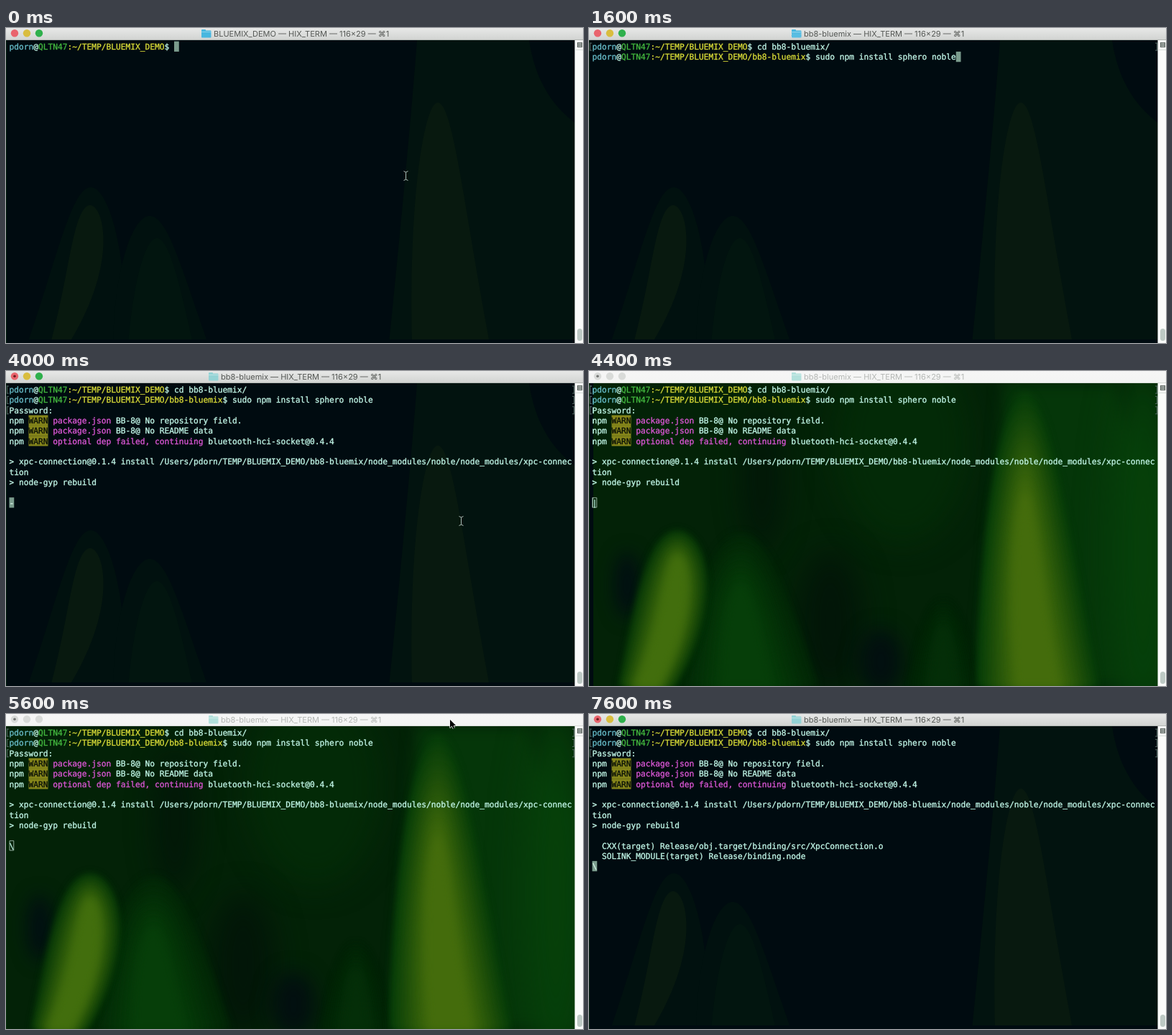
Animation of 803 by 439 pixels, one loop 8 s. Source, as an HTML page with a canvas:

```html
<!DOCTYPE html>
<html lang="en">
<head>
<meta charset="utf-8">
<title>Terminal</title>
<style>
html, body { margin: 0; width: 100%; height: 100%; overflow: hidden; background: #000b10; }
canvas { display: block; width: 803px; height: 439px; }
</style>
</head>
<body>
<canvas id="stage" width="803" height="439"></canvas>
<script>
const W = 803, H = 439, BAR = 17, EDGE = 791.5, FLOOR = 434;
const LOOP = 8000, STEP = 400;
const COL = 6.75, ROW = 14.33, LEFT = 4.5, TOP = 18.6;
const MONO = '11.2px "DejaVu Sans Mono", monospace';
const TITLE = '11px Inter, "DejaVu Sans", sans-serif';
const C = {
  text: '#bff3e4', user: '#66bac6', host: '#42b43e', path: '#d6d837',
  pink: '#d956d3', warn: '#85851a', ink: '#0c1208', cursor: '#7b9c8d'
};
const USER = 'pdorn', HOST = 'QLTN47', HOME = '~/TEMP/BLUEMIX_DEMO';
const CD = 'cd bb8-bluemix/', INSTALL = 'sudo npm install sphero noble';
const SPINNER = '\\-|/-\\|/--\\';
const ctx = document.getElementById('stage').getContext('2d');

const disc = (x, y, r, color) => {
  ctx.fillStyle = color;
  ctx.beginPath();
  ctx.arc(x, y, r, 0, 7);
  ctx.fill();
};

const mix = (a, b, k) => `rgb(${a.map((v, i) => v + (b[i] - v) * k)})`;

function layer(base, paint) {
  const c = document.createElement('canvas');
  c.width = W;
  c.height = H;
  const g = c.getContext('2d');
  g.fillStyle = base;
  g.fillRect(0, 0, W, H);
  paint(g);
  return c;
}

// A leaning hill: its half-width grows with the square root of the depth.
function hill(g, { x, top, w, lean = 0, taper = 0 }, color) {
  const side = sign => s =>
    g.lineTo(x + lean * s * s + sign * w * Math.sqrt(s) * (1 - taper * s), top + s * (H - top));
  const left = side(-1), right = side(1);
  g.fillStyle = color;
  g.beginPath();
  for (let i = 40; i >= 0; i--) left((i / 40) ** 2);
  for (let i = 0; i <= 40; i++) right((i / 40) ** 2);
  g.fill();
}

// Nested hills that run from a faint skirt to a bright core.
function ridge(g, shape, drop, from, to) {
  const n = 9;
  g.filter = 'blur(5px)';
  for (let i = 0; i <= n; i++) {
    const k = i / n;
    hill(g, { ...shape, top: shape.top + drop * k, w: shape.w * (1 - .65 * k) }, mix(from, to, k));
  }
  g.filter = 'none';
}

function shoulder(g, color) {
  g.fillStyle = color;
  g.beginPath();
  g.moveTo(533, H);
  g.quadraticCurveTo(562, 150, 572, BAR);
  g.lineTo(728, BAR);
  g.quadraticCurveTo(740, 100, W, 140);
  g.lineTo(W, H);
  g.fill();
}

function glow(g, x, y, rx, ry, color, blur) {
  g.filter = `blur(${blur}px)`;
  g.fillStyle = color;
  g.beginPath();
  g.ellipse(x, y, rx, ry, 0, 0, 7);
  g.fill();
  g.filter = 'none';
}

const capsule = { x: 117, top: 247, w: 52, lean: -42, taper: .75 };
const peak = { x: 601, top: 104, w: 54, lean: 18 };

const dark = layer('#000b10', g => {
  g.beginPath();
  g.rect(0, BAR, W, FLOOR - BAR);
  g.clip();
  shoulder(g, '#02130f');
  hill(g, peak, '#08190f');
  hill(g, { x: 118, top: 222, w: 68, lean: -20 }, '#01110f');
  hill(g, { x: 200, top: 262, w: 66, lean: 15 }, '#01110f');
  hill(g, { x: 210, top: 293, w: 45, lean: 5 }, '#02150f');
  hill(g, capsule, '#08190f');
});

const bright = layer('#032207', g => {
  glow(g, 430, 100, 95, 140, '#032a07', 20);
  glow(g, 235, 150, 30, 100, '#021808', 18);
  glow(g, 330, 350, 45, 100, '#021608', 20);
  g.filter = 'blur(10px)';
  shoulder(g, '#053609');
  g.filter = 'none';
  glow(g, 765, 250, 45, 260, '#06400a', 24);
  glow(g, 400, 405, 30, 45, '#020f10', 14);
  ridge(g, { x: 487, top: 320, w: 48 }, 40, [3, 36, 7], [4, 46, 8]);
  ridge(g, { x: 205, top: 225, w: 100, lean: 8 }, 75, [3, 38, 7], [6, 62, 9]);
  glow(g, 47, 298, 17, 46, '#010e12', 12);
  ridge(g, { ...capsule, top: 222, w: 100, taper: .6 }, 38, [8, 56, 8], [66, 110, 13]);
  ridge(g, { ...peak, top: 30, w: 85 }, 140, [8, 62, 9], [68, 108, 12]);
});

function write(str, col, row, color) {
  ctx.fillStyle = ctx.strokeStyle = color;
  ctx.lineWidth = .35;
  const y = TOP + row * ROW + 11.3;
  [...str].forEach((ch, i) => {
    if (ch === ' ') return;
    const x = LEFT + (col + i) * COL;
    ctx.fillText(ch, x, y);
    ctx.strokeText(ch, x, y);
  });
  return col + str.length;
}

function line(row, ...parts) {
  let col = 0;
  for (const [str, color] of parts) col = write(str, col, row, color || C.text);
  return col;
}

function prompt(row, dir, cmd) {
  return line(row, [USER, C.user], ['@'], [HOST, C.host], [':' + dir, C.path], ['$ '], [cmd]);
}

function warn(row, label, rest) {
  ctx.fillStyle = C.warn;
  ctx.fillRect(LEFT + 4 * COL, TOP + row * ROW, 4 * COL, ROW);
  line(row, ['npm '], ['WARN', C.ink], [' ' + label + ' ', C.pink], [rest]);
}

function brackets(row) {
  const y = TOP + row * ROW + 2;
  ctx.fillStyle = '#52645f';
  for (const [x, foot] of [[1, 1], [790, 788]]) {
    ctx.fillRect(x, y, 1, 11);
    ctx.fillRect(foot, y, 3, 1);
    ctx.fillRect(foot, y + 10, 3, 1);
  }
}

function caret(col, row, active, ch = '') {
  const x = LEFT + col * COL, y = TOP + row * ROW;
  if (active) {
    ctx.fillStyle = C.cursor;
    ctx.fillRect(x, y, COL, ROW);
  } else {
    ctx.strokeStyle = '#93ae9e';
    ctx.lineWidth = 1;
    ctx.strokeRect(x + .5, y + .5, COL - 1, ROW - 1);
  }
  write(ch, col, row, active ? '#d5f5e8' : C.text);
}

function folder(x, color, hatched) {
  ctx.fillStyle = color;
  ctx.beginPath();
  ctx.roundRect(x, 2, 6, 4, 1);
  ctx.roundRect(x, 3.5, 13.5, 10, 1);
  ctx.fill();
  ctx.fillStyle = 'rgba(255,255,255,.35)';
  ctx.fillRect(x, 5, 13.5, 1);
  if (!hatched) return;
  for (let y = 6; y < 13; y += 2)
    for (let i = y / 2 % 2; i < 13; i += 2) ctx.fillRect(x + i, y, 1, 1);
}

function titleBar(t, active) {
  const fill = ctx.createLinearGradient(0, 0, 0, BAR);
  fill.addColorStop(0, active ? '#e7e8e7' : '#f6f6f6');
  fill.addColorStop(1, active ? '#d1d3d1' : '#f3f4f3');
  ctx.fillStyle = fill;
  ctx.fillRect(0, 0, W, BAR);
  ctx.fillStyle = active ? '#b2b6b3' : '#d8dbd8';
  ctx.fillRect(0, BAR - 1, W, 1);
  ['#e9646d', '#d9bd3e', '#2fb04c'].forEach((color, i) =>
    disc(12 + 17 * i, 7.3, 5.2, active ? color : '#d9dbd9'));
  if (t >= 2400) disc(12, 7.3, 1.8, active ? '#6b1d20' : '#737573');
  const inside = t >= 1200, x = inside ? 282 : 272;
  folder(x, t < 2400 ? '#49b7df' : active ? '#94d3d5' : '#b3e1dc', inside && t < 2400);
  ctx.font = TITLE;
  ctx.fillStyle = active ? '#555855' : '#b4b7b4';
  ctx.fillText((inside ? 'bb8-bluemix' : 'BLUEMIX_DEMO') + ' — HIX_TERM — 116×29 — ⌘1', x + 17, 11.5);
}

function scrollBar() {
  ctx.fillStyle = '#fafbfa';
  ctx.fillRect(EDGE, BAR, W - EDGE, H);
  ctx.fillStyle = '#d9dedb';
  ctx.fillRect(793, 30, 10, 1);
  ctx.fillStyle = '#59615d';
  ctx.fillRect(795, 20, 7, 7);
  ctx.fillStyle = '#c3cbc7';
  for (let y = 21; y < 26; y += 2) ctx.fillRect(796, y, 5, 1);
  ctx.fillStyle = '#bdc9c4';
  ctx.beginPath();
  ctx.roundRect(795, 419, 7, 17, 3.5);
  ctx.fill();
}

function backdrop(t, active) {
  // The bright picture drifts a little to the left.
  ctx.drawImage(active ? dark : bright, active ? 0 : 6 - 6 * (t - 4400) / 1200, 0);
  ctx.fillStyle = active ? '#03200f' : '#04300a';
  ctx.fillRect(0, BAR, 1, H);
}

function iBeam(x, y) {
  ctx.strokeStyle = '#aebdb7';
  ctx.lineWidth = 1;
  ctx.beginPath();
  for (const s of [-1, 1]) {
    ctx.moveTo(x - 2.5, y + 6.5 * s);
    ctx.lineTo(x + .5, y + 5 * s);
    ctx.lineTo(x + 3.5, y + 6.5 * s);
  }
  ctx.moveTo(x + .5, y - 5);
  ctx.lineTo(x + .5, y + 5);
  ctx.stroke();
}

function arrow(x, y) {
  const head = new Path2D(`M${x} ${y}v11l3-3h5z`);
  const tail = new Path2D(`M${x + 3} ${y + 7}l2.3 5`);
  for (const [color, grow] of [['#fff', 1.4], ['#000', 0]]) {
    ctx.strokeStyle = ctx.fillStyle = color;
    ctx.lineWidth = 2 + grow;
    ctx.stroke(tail);
    ctx.lineWidth = grow || .1;
    ctx.stroke(head);
    ctx.fill(head);
  }
}

function terminal(t, active) {
  ctx.font = MONO;
  const first = prompt(0, HOME, t < 800 ? '' : CD);
  if (t < 1200) {
    if (t !== 400) caret(first, 0, true);
    return;
  }
  brackets(0);
  const second = prompt(1, HOME + '/bb8-bluemix', t < 1600 ? INSTALL.slice(0, 8) : INSTALL);
  if (t < 2000) return caret(second, 1, true);
  brackets(1);
  const pass = line(2, ['Password:']);
  if (t < 3200) return caret(pass, 2, true);
  brackets(2);
  if (t < 3600) return caret(0, 3, true);
  warn(3, 'package.json', 'BB-8@ No repository field.');
  warn(4, 'package.json', 'BB-8@ No README data');
  warn(5, 'optional dep failed, continuing', 'bluetooth-hci-socket@0.4.4');
  const job = `> xpc-connection@0.1.4 install /Users/${USER}/TEMP/BLUEMIX_DEMO/bb8-bluemix/node_modules/noble/node_modules/xpc-connection`;
  line(7, [job.slice(0, 116)]);
  line(8, [job.slice(116)]);
  line(9, ['> node-gyp rebuild']);
  let row = 11;
  if (t >= 6000) line(row++, ['  CXX(target) Release/obj.target/binding/src/XpcConnection.o']);
  if (t >= 7600) line(row++, ['  SOLINK_MODULE(target) Release/binding.node']);
  caret(0, row, active, SPINNER[(t - 3600) / STEP]);
}

function draw(now) {
  const t = Math.floor(now % LOOP / STEP) * STEP;
  const active = t < 4400 || t >= 6000;
  ctx.textRendering = 'geometricPrecision';
  ctx.lineJoin = 'round';
  backdrop(t, active);
  scrollBar();
  titleBar(t, active);
  terminal(t, active);
  if (t < 400) iBeam(556, 206);
  if (t === 4000) iBeam(633, 209);
  if (t === 5600) arrow(618, 8);
  if (t >= 6000 && t < 7600) iBeam(467, 186);
}

const start = performance.now();
function tick() {
  draw(performance.now() - start);
  requestAnimationFrame(tick);
}
tick();
</script>
</body>
</html>
```
